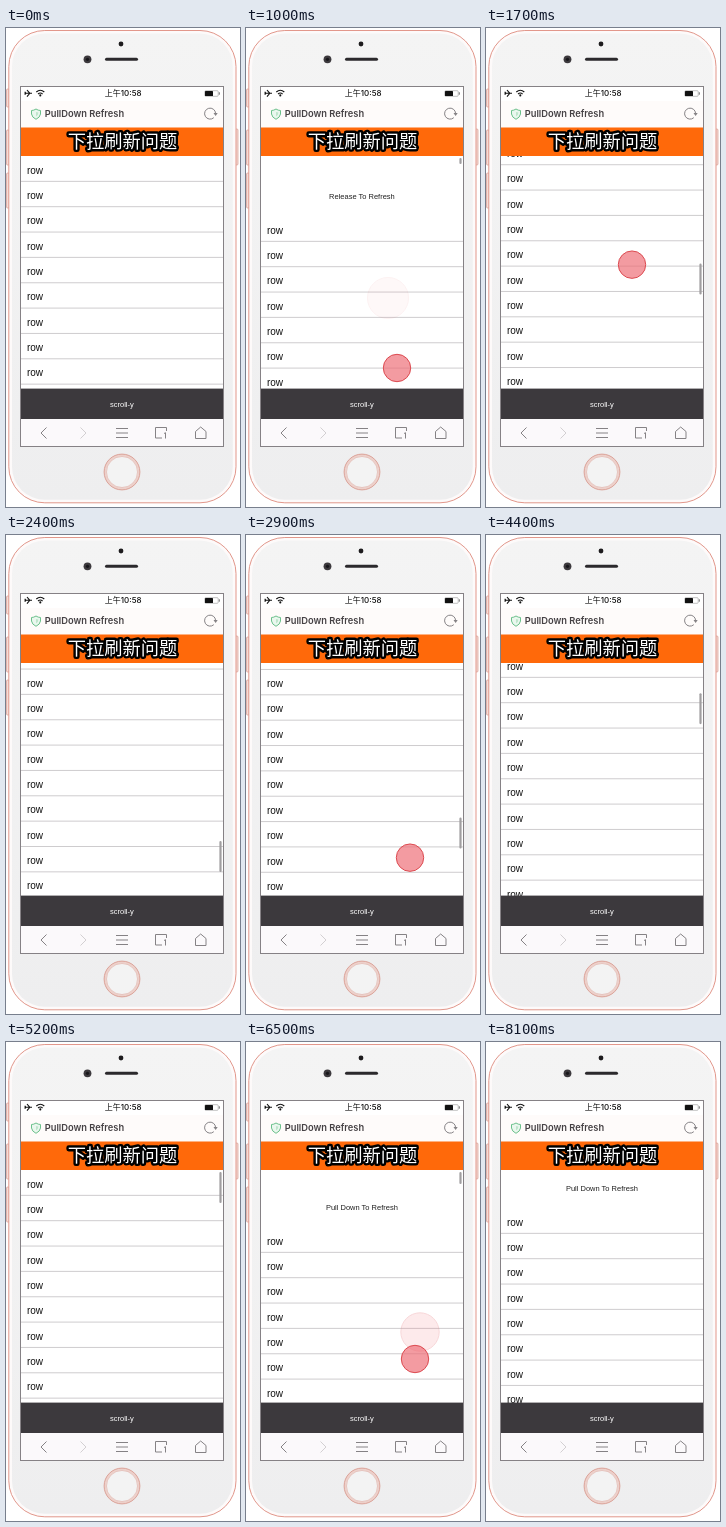
These frames come from a looping animation (234x479 px, 8.2 s). An HTML page:

```html
<!DOCTYPE html>
<html lang="en">
<head>
<meta charset="utf-8">
<title>PullDown Refresh</title>
<style>
  html, body { margin: 0; width: 100%; height: 100%; overflow: hidden; background: #fff; }
  svg { display: block; }
  text { font-family: "Liberation Sans", Arial, sans-serif; }
  .mid { text-anchor: middle; }
  .icon { fill: none; stroke: #858285; stroke-width: 1; }
  .title { font: 600 9.3px Inter, sans-serif; fill: #454144; }
  .time { font: 500 8px Inter, "Noto Sans CJK SC", "Noto Sans CJK", sans-serif; fill: #111; }
  .caption {
    font: 400 18.3px "Noto Sans CJK SC", "Noto Sans CJK", sans-serif;
    fill: #fff; stroke: #000; stroke-width: 4.8; stroke-linejoin: round; paint-order: stroke;
  }
  .small { font-size: 7.5px; }
  .row { font-size: 10px; fill: #111; }
</style>
</head>
<body>
<svg width="234" height="479" viewBox="0 0 234 479">
  <defs>
    <clipPath id="list"><rect x="15" y="128" width="202.5" height="233"/></clipPath>
    <linearGradient id="body" x2="0" y2="1">
      <stop stop-color="#f4f4f4"/>
      <stop offset="1" stop-color="#eeeeef"/>
    </linearGradient>
  </defs>

  <!-- phone body -->
  <g id="buttons" fill="#f3dcd7" stroke="#d99b91" stroke-width=".7"></g>
  <rect x="2.800" y="2.500" width="227.200" height="472.300" rx="36" fill="#fdfafa" stroke="#e2978b"/>
  <rect x="6" y="5.500" width="220.800" height="466.300" rx="33" fill="url(#body)"/>
  <circle cx="115" cy="16" r="2.400" fill="#1d1b1d"/>
  <circle cx="81.500" cy="31.300" r="3.900" fill="#3c393d"/>
  <circle cx="81.500" cy="31.300" r="1.600" fill="#17161a"/>
  <path d="M100.500 31.300H130.500" stroke="#2b292c" stroke-width="3" stroke-linecap="round"/>
  <circle cx="116" cy="444" r="16.800" fill="#f3f3f3" stroke="#edd0ca" stroke-width="2.400"/>
  <circle cx="116" cy="444" r="17.900" fill="none" stroke="#d99e94" stroke-width=".9"/>
  <circle cx="116" cy="444" r="15.500" fill="none" stroke="#dfb0a8" stroke-width=".6"/>

  <!-- status and title bars -->
  <rect x="15" y="58.500" width="202.500" height="360" fill="#fff"/>
  <rect x="15" y="73" width="202.500" height="27" fill="#fefbfa"/>
  <path d="M18.500 65.300H26M21 62L23.800 65.300L21 68.600M18.800 63.800L19.800 65.300L18.800 66.800" fill="none" stroke="#111" stroke-width="1.100"/>
  <g fill="none" stroke="#111" stroke-width="1.100">
    <path d="M30.300 64Q34.300 60.600 38.300 64M32 66Q34.300 64.100 36.600 66"/>
    <circle cx="34.300" cy="67.400" r=".5"/>
  </g>
  <text class="time mid" x="117.200" y="68.200">上午10:58</text>
  <rect x="198.800" y="62.700" width="13.400" height="5.600" rx="1" fill="#fff" stroke="#999" stroke-width=".6"/>
  <rect x="199" y="63" width="8" height="5" rx=".6" fill="#111"/>
  <path d="M213.300 64.300V66.700" stroke="#777"/>
  <path d="M30 81Q32.200 82.500 34.500 82.500V86Q34 89.500 30 91.300Q26 89.500 25.500 86V82.500Q27.800 82.500 30 81Z" fill="#eaf7ee" stroke="#6cc18c"/>
  <path d="M30 84V88.500Q32.300 87.500 32.400 84.500Z" fill="#bfe5cc"/>
  <text class="title" x="38.700" y="89.300">PullDown Refresh</text>
  <path class="icon" d="M207.800 89.700A5.500 5.500 0 1 1 209.600 85.500"/>
  <path d="M207.500 85H211.700L209.600 88Z" fill="#858285"/>

  <g clip-path="url(#list)">
    <g id="rows"></g>
    <text id="hint" class="small mid" x="115.900" y="111.400" fill="#222"></text>
    <rect id="bar" x="213.400" width="2.200" rx="1.100" fill="#a09ea0"/>
  </g>

  <rect x="15" y="99.500" width="202.500" height="28.500" fill="#ff690a"/>
  <text class="caption mid" x="116.500" y="120">下拉刷新问题</text>

  <!-- bottom bars -->
  <rect x="15" y="360.600" width="202.500" height="30.400" fill="#3c393d"/>
  <text class="small mid" x="115.900" y="378.700" fill="#fff">scroll-y</text>
  <rect x="15" y="391" width="202.500" height="27.500" fill="#fbf9fb"/>
  <path class="icon" d="M40.500 399.500L35 405L40.500 410.500"/>
  <path class="icon" d="M74.500 399.500L80 405L74.500 410.500" style="stroke:#d3d0d2"/>
  <path class="icon" d="M110 400.500H122M110 405H122M110 409.500H122"/>
  <path class="icon" d="M156 410H149.500V399.500H160.500V403M158 405.500L159.500 404.700V410.500"/>
  <path class="icon" d="M189.500 403.500L194.700 399L200 403.500V410.500H189.500Z"/>
  <rect x="14.500" y="58.500" width="203" height="360" fill="none" stroke="#858185"/>

  <g id="touches"></g>
</svg>

<script>
const LOOP = 8200, STEP = 100, PITCH = 25.35, TOP = 128, REST = 38;
const BAR_LEN = 31, BAR_RATIO = 200 / 1520, DRAG = 300, FADE = 350;

// [ms, list offset] at the end of each swipe: positive is pulled down
const swipes = [
  [300, 0], [1000, 60], [1200, 30], [2400, -1337.5], [2700, -1400],
  [3400, -846], [4400, -213.8], [5200, 0], [5900, 0], [6500, 57], [7000, REST]
];

// [start ms, x, from y, to y]
const drags = [
  [400, 142, 195, 270], [800, 151, 244, 388], [1500, 146, 330, 190],
  [2700, 164, 200, 384], [3700, 170, 200, 345],
  [6000, 174, 215, 290], [6400, 169, 304, 343]
];

const $ = id => document.getElementById(id);
const clamp = v => Math.min(1, Math.max(0, v));
const easeOut = p => Math.sin(p * Math.PI / 2);
const pulse = (t, from, to) => clamp(Math.min((t - from) / 100, (to - t) / 400));

function set(el, attrs) {
  for (const k in attrs) el.setAttribute(k, attrs[k]);
}

function add(parent, tag, attrs) {
  const el = document.createElementNS("http://www.w3.org/2000/svg", tag);
  set(el, attrs);
  parent.append(el);
  return el;
}

// Every swipe slows down towards its end
function offsetAt(t) {
  let y = swipes[0][1];
  for (let i = 1; i < swipes.length; i++) {
    const [t0, y0] = swipes[i - 1], [t1, y1] = swipes[i];
    y += (y1 - y0) * easeOut(clamp((t - t0) / (t1 - t0)));
  }
  return y;
}

function addButton(x, y, height) {
  add($("buttons"), "rect", { x, y, width: 3, height, rx: 1 });
}
addButton(.5, 61, 18);
addButton(.5, 102, 35);
addButton(.5, 145, 35);
addButton(229, 101, 36);

for (let i = 0; i < 11; i++) {
  const y = TOP + i * PITCH;
  add($("rows"), "text", { x: 20.9, y: y + 17.6, class: "row" }).textContent = "row";
  add($("rows"), "path", { d: `M15 ${y + PITCH}H217.5`, stroke: "#c9c7c9", "stroke-width": .9 });
}

const dots = drags.map(([, cx]) => add($("touches"), "circle", {
  cx, fill: "#ee6c74", "fill-opacity": .68, stroke: "#dc4a50"
}));

// A released touch grows and fades away
function drawTouch(dot, [start, , from, to], t) {
  const age = clamp((t - start - DRAG) / FADE);
  set(dot, {
    cy: from + (to - from) * clamp((t - start) / DRAG),
    r: 13.7 + 7 * easeOut(age),
    opacity: t < start ? 0 : age ? .5 * (1 - age) : 1
  });
}

function draw(t) {
  const off = offsetAt(t);
  const pull = Math.max(0, off), scroll = Math.max(0, -off);
  set($("rows"), { transform: `translate(0 ${pull - scroll % PITCH})` });
  set($("hint"), { transform: `translate(0 ${pull})` });
  $("hint").textContent = pull >= 59.5 ? "Release To Refresh" : "Pull Down To Refresh";

  const over = Math.max(0, pull - (t > 5900 ? REST : 0));
  set($("bar"), {
    y: 130 + scroll * BAR_RATIO,
    height: Math.max(6, BAR_LEN - over),
    opacity: Math.max(pulse(t, 200, 5700), pulse(t, 5900, 7300))
  });
  drags.forEach((drag, i) => drawTouch(dots[i], drag, t));
}

const start = performance.now();
function tick(now) {
  const t = Math.max(0, now - start) % LOOP;
  draw(Math.floor(t / STEP) * STEP);
  requestAnimationFrame(tick);
}
draw(0);
requestAnimationFrame(tick);
</script>
</body>
</html>
```
